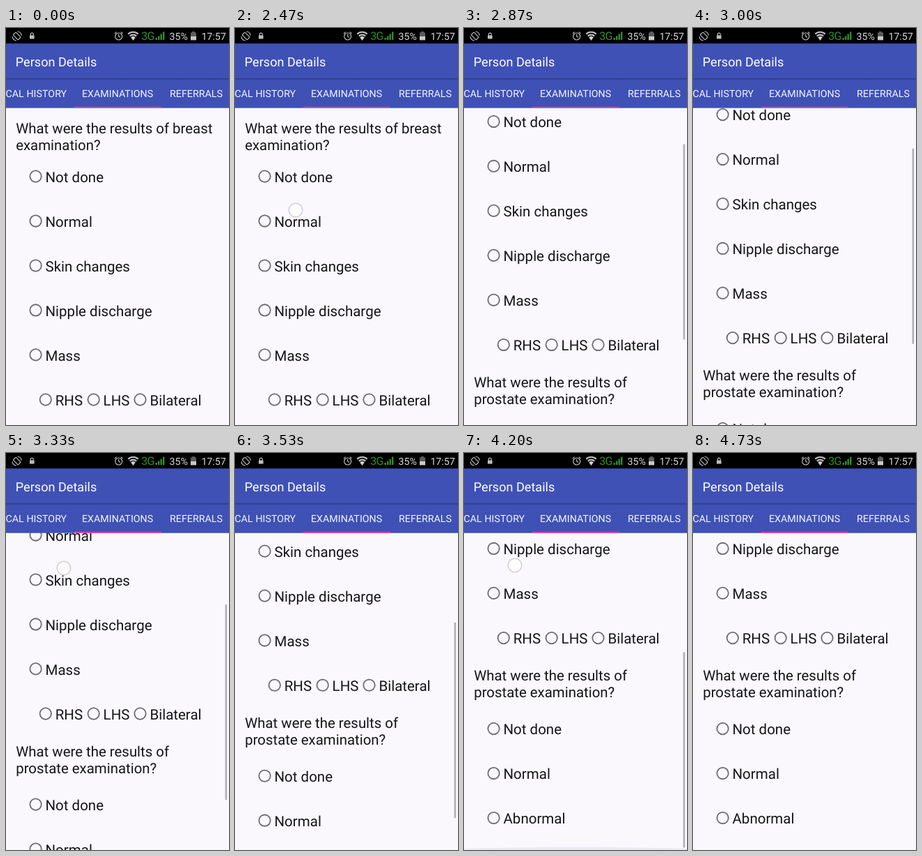
Recreate the animation shown at these times as an HTML page. Size 320 by 569 pixels, loop 7790 ms.

```html
<!DOCTYPE html>
<html lang="en">
<head>
<meta charset="utf-8">
<title>Person Details</title>
<style>
  html, body { margin: 0; width: 100%; height: 100%; overflow: hidden; background: #faf8fd; }
  svg { display: block; width: 100vw; height: 100vh; font-family: Roboto, sans-serif; text-rendering: geometricPrecision; }
  .heading { font-size: 20.4px; fill: #151517; }
  .label { font-size: 20.5px; fill: #151517; }
  .radio { fill: none; stroke: #6c6b6e; stroke-width: 1.8; }
  .tab { font-size: 14.2px; letter-spacing: .06px; fill: #f4f5fc; }
  .status { font-size: 14.2px; fill: #d8d8d8; }
  .line { fill: none; stroke: #bdbdbd; stroke-width: 1.2; }
</style>
</head>
<body>
<svg viewBox="0 0 320 569">
  <defs>
    <clipPath id="viewport"><rect y="114" width="320" height="455"/></clipPath>
    <linearGradient id="shade" x2="0" y2="1">
      <stop stop-opacity=".28"/>
      <stop offset="1" stop-opacity="0"/>
    </linearGradient>
  </defs>
  <rect width="320" height="569" fill="#faf8fd"/>

  <g clip-path="url(#viewport)">
    <g id="form"></g>
    <ellipse id="glow" cx="160" cy="569" rx="175" ry="4" fill="#3f51b5" opacity="0"/>
    <rect id="bar" x="314.5" width="2.6" height="280" fill="#b1b0b4"/>
  </g>

  <rect y="22" width="320" height="92.7" fill="#3f51b5"/>
  <rect y="72" width="320" height="3" fill="url(#shade)"/>
  <text x="13.8" y="54.7" font-size="18.1" fill="#fff">Person Details</text>
  <text class="tab" x="87.2" y="98.9" text-anchor="end">MEDICAL HISTORY</text>
  <text class="tab" x="160.1" y="98.9" text-anchor="middle">EXAMINATIONS</text>
  <text class="tab" x="273" y="98.9" text-anchor="middle">REFERRALS</text>
  <rect x="98" y="112.9" width="125" height="1.8" fill="#f03f98"/>

  <rect width="320" height="22.2" fill="#000"/>
  <g class="line">
    <rect x="-2.8" y="-5" width="5.6" height="10" rx="1" transform="translate(15.7 11.5) rotate(-45)"/>
    <path d="M16.5 5a6.6 6.6 0 0 1 5.8 5.8M14.9 18a6.6 6.6 0 0 1-5.8-5.8"/>
    <path d="M35.4 11V9a1.9 1.9 0 0 1 3.8 0v2"/>
    <circle cx="161.7" cy="12" r="5"/>
    <path d="M161.7 8.8V12l2.4 1.6M156 8l2.6-2.4M167.4 8l-2.6-2.4"/>
    <path d="M175.3 8.6a10.5 10.5 0 0 1 14.4 0M177.8 11.6a6.8 6.8 0 0 1 9.4 0" stroke-width="2.2"/>
  </g>
  <rect x="34" y="10.6" width="6.6" height="5" rx=".6" fill="#bdbdbd"/>
  <path d="M179.2 13.4a4.8 4.8 0 0 1 6.6 0l-3.3 4.6z" fill="#d0d0d0"/>
  <text x="194.3" y="17" font-size="16" letter-spacing="-.8" fill="#318d2b">3G</text>
  <path d="M214.5 17v-3h2.4v3zM218 17v-5.6h2.4V17zM221.5 17V8.6h2.4V17zM225 17V5.6h2.4V17z" fill="#318d2b"/>
  <text class="status" x="234.5" y="16.6">35%</text>
  <path d="M265 6.5h2V5h4v1.5h2V12h-8z" fill="#5c5c5c"/>
  <path d="M265 12h8v5.4h-8z" fill="#c9c9c9"/>
  <text class="status" x="280.4" y="16.6">17:57</text>

  <circle id="finger" r="9.8" fill="#fff" fill-opacity=".65" stroke="#d1cfd4" stroke-width="1.5"/>
</svg>
<script>
const LOOP = 7790, FPS = 15;
const $ = id => document.getElementById(id);
const form = $('form'), bar = $('bar'), glow = $('glow'), finger = $('finger');

function add(tag, attrs, text = '') {
  const el = document.createElementNS(form.namespaceURI, tag);
  for (const key in attrs) el.setAttribute(key, attrs[key]);
  el.textContent = text;
  form.append(el);
}

function heading(y, ...lines) {
  lines.forEach((line, i) => add('text', { class: 'heading', x: 14.2, y: y + i * 24.2 }, line));
}

function option(x, y, label) {
  add('circle', { class: 'radio', cx: x, cy: y - .4, r: 8.2 });
  add('text', { class: 'label', x: x + 13.9, y: y + 7.7 }, label);
}

function options(y, ...labels) {
  labels.forEach((label, i) => option(42.6, y + i * 63.95, label));
}

heading(150.8, 'What were the results of breast', 'examination?');
options(213, 'Not done', 'Normal', 'Skin changes', 'Nipple discharge', 'Mass');
option(56.8, 533, 'RHS');
option(125.7, 533, 'LHS');
option(192.5, 533, 'Bilateral');
heading(593.5, 'What were the results of', 'prostate examination?');
options(663, 'Not done', 'Normal', 'Abnormal');

// Linear interpolation over [tick, ...values] points, held at both ends.
function track(points, tick) {
  const i = points.findIndex(p => p[0] > tick);
  if (i === 0) return points[0].slice(1);
  if (i < 0) return points.at(-1).slice(1);
  const a = points[i - 1], b = points[i], f = (tick - a[0]) / (b[0] - a[0]);
  return a.slice(1).map((v, k) => v + (b[k + 1] - v) * f);
}

const firstDrag = [[37, 0], [38, 8], [39, 30]];
const lastDrag = [[59, 205.5], [60, 215], [61, 234], [62, 254], [63, 267.5]];
const swipes = [
  [[37, 87, 261], [38, 87, 250], [39, 86, 222]],
  [[49, 86, 241], [50, 83, 165]],
  [[58, 114, 267], [59, 114, 267], [60, 108, 252], [63, 73, 161]]
];

function fling(tick, start, end, from, to) {
  const left = Math.max(0, (end - tick) / (end - start));
  return to - (to - from) * left ** 2.3;
}

function scrollAt(tick) {
  if (tick < 39) return track(firstDrag, tick)[0];
  if (tick < 50) return fling(tick, 39, 47, 30, 91);
  if (tick < 59) return fling(tick, 50, 55, 159, 205.5);
  return track(lastDrag, tick)[0];
}

function draw(now) {
  // The screen was sampled at a fixed rate, so motion advances in whole ticks.
  const tick = Math.floor((now % LOOP + 4) * FPS / 1000);
  const scroll = scrollAt(tick);
  form.setAttribute('transform', `translate(0 ${-scroll})`);
  bar.setAttribute('y', 117 + scroll * .63);
  bar.setAttribute('opacity', tick < 38 || tick > 70 ? 0 : tick === 70 ? .4 : 1);
  glow.setAttribute('opacity', tick < 63 ? 0 : Math.max(0, .09 * (69 - tick) / 6));

  const swipe = swipes.find(s => tick >= s[0][0] && tick <= s.at(-1)[0]);
  finger.setAttribute('visibility', swipe ? 'visible' : 'hidden');
  if (swipe) finger.setAttribute('transform', `translate(${track(swipe, tick)})`);
}

const start = performance.now();
function loop() {
  draw(performance.now() - start);
  requestAnimationFrame(loop);
}
loop();
</script>
</body>
</html>
```
